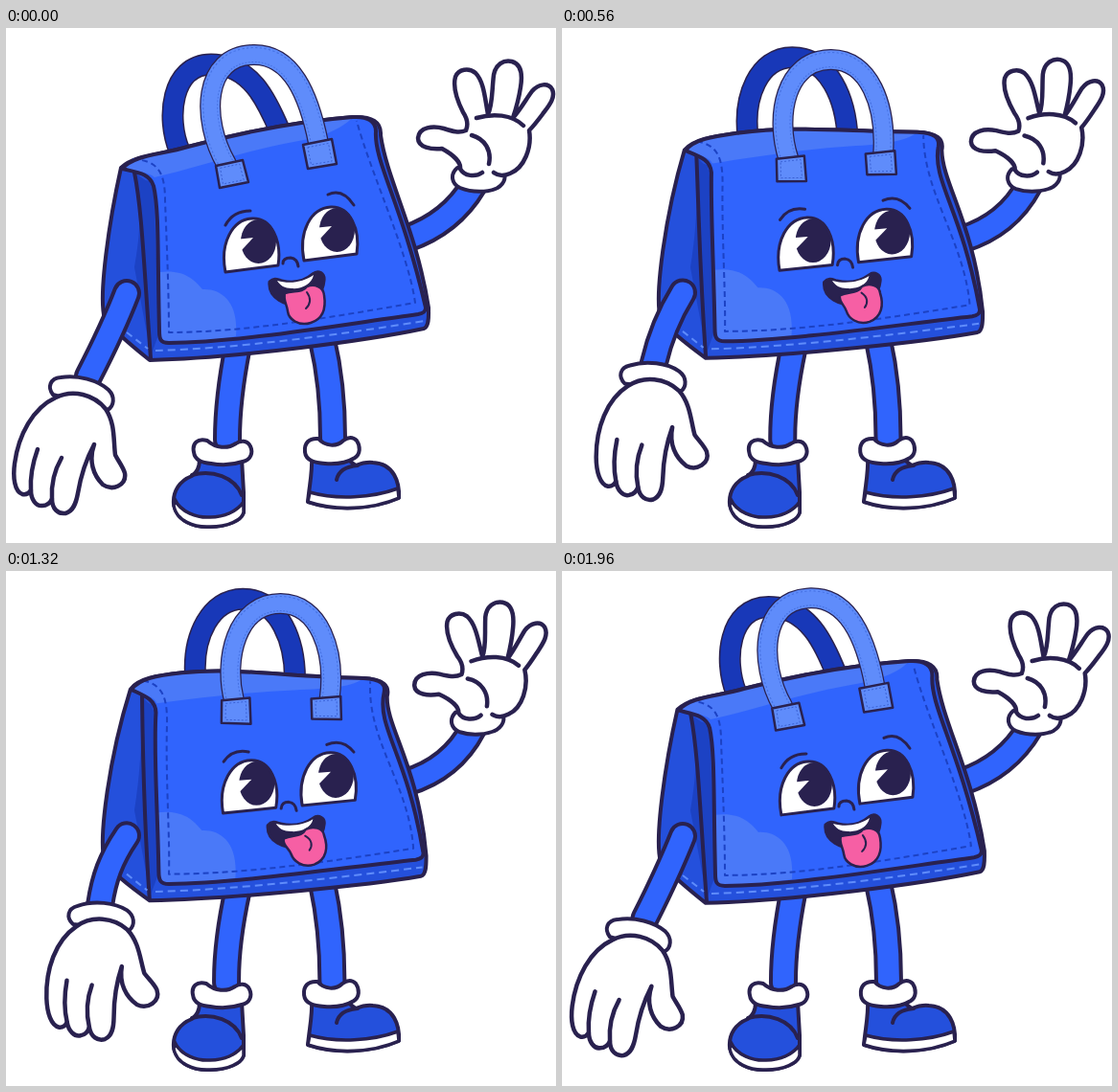
These frames come from a looping animation (574x538 px, 2000 ms). An HTML page:

```html
<!DOCTYPE html>
<html lang="en">
<head>
<meta charset="utf-8">
<title>Waving handbag</title>
<style>
  html, body { margin: 0; width: 100%; height: 100%; overflow: hidden; background: #fff; }
  svg { display: block; width: 574px; height: 538px; fill: none; stroke-linecap: round; stroke-linejoin: round; }
</style>
</head>
<body>
<svg id="stage" viewBox="0 0 574 538"></svg>
<script>
const INK = '#29214f', BLUE = '#3064fd', SIDE = '#2450dc', DEEP = '#1838b8', LIGHT = '#5f8cfb';
const GLOW = '#4a79f8', STITCH = '#1c42c4', WHITE = '#fff', PINK = '#f65fa4';
const LOOP = 2000, STEP = 40;
const stage = document.getElementById('stage');
const updates = [];

function add(tag, attrs, parent = stage) {
  const el = document.createElementNS('http://www.w3.org/2000/svg', tag);
  for (const key in attrs) el.setAttribute(key, attrs[key]);
  parent.append(el);
  return el;
}

// Blends two absolute paths of equal structure; x and y have their own progress.
function mix(from, to, ux, uy) {
  const ends = to.match(/-?[\d.]+/g);
  let i = 0;
  return from.replace(/-?[\d.]+/g, n => {
    const u = i % 2 ? uy : ux;
    return (+n + (ends[i++] - n) * u).toFixed(2);
  });
}

function path(from, to, attrs, parent) {
  const el = add('path', { d: from, ...attrs }, parent);
  if (to) updates.push((ux, uy) => el.setAttribute('d', mix(from, to, ux, uy)));
  return el;
}

function group(transform) {
  const el = add('g', {});
  updates.push((ux, uy) => el.setAttribute('transform', transform(ux, uy)));
  return el;
}

const line = (width, color = INK) => ({ stroke: color, 'stroke-width': width });
const shape = (fill, width = 4) => ({ fill, ...line(width) });
const dash = (color, pattern, width = 2) =>
  ({ ...line(width, color), 'stroke-dasharray': pattern, 'stroke-linecap': 'butt' });

function tube(from, to, outer, inner, color) {
  path(from, to, line(outer));
  path(from, to, line(inner, color));
}

function legs() {
  tube('M242 332 C236 362 231 400 231 430', 'M242 332 C235 362 229 400 229.5 430', 30, 22, BLUE);
  tube('M330 326 C338 360 341 395 341 428', 'M330 326 C337 360 340 395 340 428', 30, 22, BLUE);

  path('M202 450 C202 460 199 464 194 468 C181 473 174 484 175 497 C178 515 196 522 213 521 C232 521 246 514 248 506 L248 485 L246 450 Z', null, shape(SIDE));
  path('M176 492 C182 506 200 512 213 511 C228 511 241 505 248 495 L248 506 C246 514 232 521 213 521 C196 522 178 515 175 499 Z', null, shape(WHITE, 3.5));
  path('M194 467 C215 461 239 469 246 488', null, line(4));

  path('M319 448 C320 463 317 475 315 495 C345 505 382 503 410 491 C411 475 405 455 383 454 C375 453 370 455 365 457 C359 453 356 450 354 446 Z', null, shape(SIDE));
  path('M317 485 C345 493 382 491 409 481 L410 491 C382 503 345 505 315 495 Z', null, shape(WHITE, 3.5));
  path('M345 472 C347 462 355 458 367 457', null, line(4));

  const socks = group(ux => `translate(${-1.5 * ux} 0)`);
  path('M210 431 C200 428 194 434 196 443 C197 452 205 454 214 455 C225 457 238 456 247 453 C256 451 258 443 255 437 C252 430 244 431 240 434 C231 440 219 439 210 431 Z', null, shape(WHITE), socks);
  path('M326 429 C316 428 311 434 312 443 C313 452 322 454 333 455 C346 456 356 454 364 449 C370 445 370 437 366 431 C361 426 356 428 352 431 C345 438 333 437 326 429 Z', null, shape(WHITE), socks);
}

function rightArm() {
  tube('M418 220 C450 209 472 191 488 164', 'M418 221 C450 212 473 193 487 164', 30, 22, BLUE);
  const hand = group((ux, uy) => `translate(${-1.5 * ux} 0) rotate(${-6 * uy} 492 158)`);
  path('M471 146 C463 153 465 163 474 167 C486 172 503 172 513 167 C521 162 523 154 517 149 Z', null, shape(WHITE), hand);
  path('M497 151 C490 156 478 155 474 147 C475 140 466 132 455 126 C444 127 430 125 430 115 C431 103 446 102 457 105 C466 108 473 110 480 107 C483 100 481 94 477 88 C471 76 466 62 469 51 C472 43 483 41 490 47 C499 56 500 75 503 90 C508 80 507 65 509 49 C511 38 519 33 528 35 C539 38 539 50 537 62 C535 75 532 85 529 94 C537 85 543 74 549 66 C556 58 566 57 570 64 C574 73 566 82 560 90 C554 98 549 104 546 107 C549 125 541 146 526 152 C519 155 514 155 509 151', null, shape(WHITE, 4.5), hand);
  path('M491 94 C508 89 528 90 540 102 M486 112 C500 116 507 128 504 142', null, line(4.5), hand);
}

function bag() {
  tube('M181 128 C167 95 172 38 214 38 C255 38 272 75 286 108',
       'M208 102 C212 55 240 25 268 25 C305 25 322 75 311 122', 23, 20, DEEP);

  path('M120 146 C135 132 160 133 190 124 C250 108 310 97 362 93 C382 92 392 98 391 112 C398 160 428 210 441 292 C441 300 442 312 436 314 C380 326 240 345 150 347 C135 335 112 316 103 304 C96 280 108 200 120 146 Z',
       'M136 113 C140 103 155 98 180 98 C235 97 280 117 380 121 C402 123 406 130 402 140 C396 165 432 200 437 300 C437 308 437 320 431 321 C380 329 240 341 150 343 C135 333 112 316 103 304 C96 280 108 190 136 113 Z', shape(SIDE));
  path('M135 157 C142 190 140 215 134 250 L150 335 L156 300 L150 160 Z',
       'M146 125 C142 170 140 210 134 250 L150 335 L156 300 L154 130 Z', { fill: STITCH });
  path('M134 151 C142 190 144 250 151 343 L160 318 L154 165 Z',
       'M147 120 C143 180 143 250 149 340 L159 315 L157 140 Z', { fill: STITCH });
  path('M134 151 C142 190 144 250 151 345', 'M147 120 C143 180 143 250 149 341', line(4));
  path('M156 337 C240 335 350 320 437 306', 'M156 334 C240 332 350 320 433 311', dash(LIGHT, '8 5'));
  path('M126 318 L148 335', 'M126 316 L147 333', dash(LIGHT, '7 5'));

  const flap = [
    'M121 147 C135 132 160 133 190 124 C250 108 310 97 362 93 C378 92 386 98 386 108 C384 140 412 180 438 292 C438 296 436 298 430 299 C350 310 240 329 170 329 C161 329 160 325 160 316 C158 240 160 190 154 165 C150 152 138 151 121 147 Z',
    'M137 113 C142 103 155 98 180 98 C235 97 280 117 380 121 C401 123 403 128 400 136 C388 175 422 195 434 296 C434 300 432 302 426 303 C350 310 240 325 170 326 C161 326 159 322 159 313 C158 240 150 190 158 140 C160 126 150 121 137 113 Z'];
  path(...flap, { fill: BLUE });
  path('M121 147 C135 132 160 133 190 124 C250 108 310 97 362 93 C350 106 330 114 300 119 C250 128 200 146 155 156 C150 151 138 150 121 147 Z',
       'M137 113 C142 103 155 98 180 98 C235 97 280 117 380 121 C370 128 345 127 300 127 C250 126 200 126 159 130 C158 122 150 120 137 113 Z', { fill: GLOW });
  path('M160 255 C185 252 196 262 205 273 C225 272 243 286 240 322 C210 327 185 329 162 328 Z',
       'M157 251 C184 248 195 259 204 270 C224 269 242 283 239 320 C210 324 185 326 161 325 Z', { fill: GLOW });
  path('M132 137 C158 138 166 150 166 180 C168 230 170 280 170 318 C250 318 340 302 427 287 C420 235 380 150 366 97',
       'M150 104 C170 110 171 128 169 160 C166 220 172 280 170 316 C250 316 340 304 424 291 C420 215 375 190 389 124', dash(STITCH, '6 4'));
  path(...flap, line(4));

  const handle = [
    'M230 142 C203 95 206 29 258 28 C298 27 316 70 326 120',
    'M243 132 C242 90 262 37 304 37 C345 37 362 90 345 140'];
  tube(...handle, 22, 19.5, LIGHT);
  path(...handle, dash('#4470e2', '2 2', 16));
  path(...handle, line(14, LIGHT));
  patch('M219 144 L247 138 L253 161 L223 167 Z', 'M229 131 L259 130 L257 159 L226 155 Z');
  patch('M310 122 L340 116 L345 142 L315 147 Z', 'M324 139 L355 138 L353 161 L322 158 Z');
}

function patch(from, to) {
  path(from, to, shape(LIGHT, 2.5));
  const inset = d => {
    const n = d.match(/\d+/g).map(Number);
    const mid = [0, 1].map(k => (n[k] + n[k + 2] + n[k + 4] + n[k + 6]) / 4);
    let i = 0;
    return d.replace(/\d+/g, v => { const c = mid[i++ % 2]; return c + (v - c) * 0.72; });
  };
  path(inset(from), inset(to), dash('#3a62d6', '2 2', 1));
}

function eye(x, y, toX, toY) {
  const dome = 'M229 255 C223 225 236 200 257 199 C277 198 288 222 284 248 Z';
  const g = group((ux, uy) =>
    `translate(${x + (toX - x) * ux} ${y + (toY - y) * uy}) rotate(${2 * uy} 256 228)`);
  path(dome, null, { fill: WHITE }, g);
  add('ellipse', { cx: 263.5, cy: 223, rx: 18.5, ry: 23, fill: INK }, g);
  path('M239 221 L258 219 L246 232 Z', null, { fill: WHITE }, g);
  path(dome, null, line(3), g);
}

function face() {
  eye(0, 0, -3, -2);
  eye(82, -12, 80, -8);
  path('M229 206 Q237 191 255 191', 'M226 196 Q236 183 252 188', line(3));
  path('M336 174 Q351 167 363 185', 'M334 185 Q351 178 363 191', line(3));
  path('M289 246 Q289 240 297 240 Q304 241 305 249', 'M286 249 Q287 242 294 242 Q301 243 302 251', line(3));
  path('M275 265 C280 260 284 263 288 264 C301 267 312 264 320 257 C326 252 333 256 332 264 C331 277 321 289 305 290 C293 290 273 283 275 265 Z',
       'M272 266 C277 260 282 263 286 264 C299 267 312 264 320 259 C326 255 334 258 332 266 C331 278 318 289 304 289 C290 289 271 284 272 266 Z', shape(INK, 3));
  path('M283 264 C297 268 311 265 321 258 C319 268 308 273 298 272 C291 272 286 269 283 264 Z',
       'M281 264 C297 268 311 265 320 260 C318 269 307 273 297 272 C289 272 284 269 281 264 Z', { fill: WHITE });
  path('M291 277 C300 274 310 277 314 270 C322 267 331 270 332 279 C334 292 331 304 318 308 C305 312 295 304 294 296 C293 288 289 284 291 277 Z',
       'M289 281 C300 276 308 278 312 270 C320 265 331 268 332 275 C338 287 337 300 324 306 C312 310 303 302 300 296 C297 290 288 288 289 281 Z', shape(PINK, 2.5));
  path('M314 276 C319 283 317 289 313 293', 'M311 277 C320 280 322 286 319 291', line(2));
}

function leftArm() {
  tube('M126 277 C116 303 101 335 86 364', 'M126 276 C105 300 103 315 106 340', 30, 22, BLUE);
  const hand = group((ux, uy) => `translate(${33 * ux} ${-28 * uy}) rotate(${-14 * uy} 79 382)`);
  path('M49 383 C43 375 46 366 57 365 C75 362 96 368 107 378 C114 385 113 395 106 399 Z', null, shape(WHITE), hand);
  path('M52 386 C28 397 13 425 9 455 C7 470 9 484 17 487 C21 488 24 486 26 483 C26 492 31 500 38 499 C43 499 46 496 48 492 C48 502 54 508 62 507 C70 505 73 497 75 486 C78 468 84 450 92 435 C86 452 91 467 101 477 C111 484 126 478 124 465 C122 458 117 452 114 446 C112 430 114 413 104 398 C92 383 70 377 52 386 Z', null, shape(WHITE, 4.5), hand);
  path('M33 440 C28 454 25 468 26 483 M58 449 C50 463 47 477 48 492', null, line(4.5), hand);
}

legs();
rightArm();
bag();
face();
leftArm();

function draw() {
  const t = Math.floor(performance.now() % LOOP / STEP) * STEP;
  const p = 1 - Math.abs(t * 2 / LOOP - 1);
  const sway = p * (0.7 + 0.3 * p);
  for (const update of updates) update(sway, p);
  requestAnimationFrame(draw);
}
draw();
</script>
</body>
</html>
```
